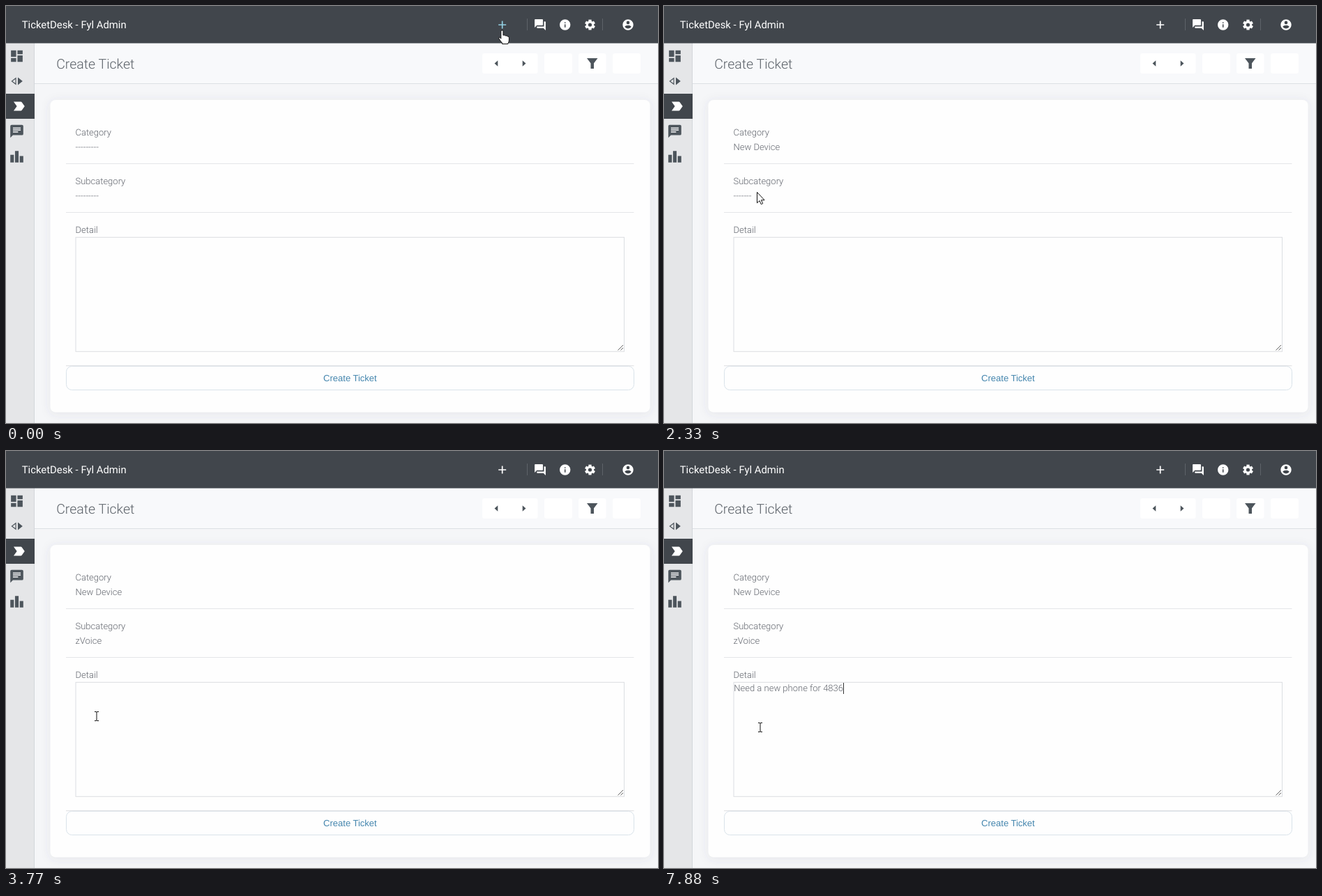
Recreate the animation shown at these times as an HTML page. Size 935 by 599 pixels, loop 8 s.

```html
<!DOCTYPE html>
<html lang="en">
<head>
<meta charset="utf-8">
<title>Create Ticket</title>
<style>
html, body { margin: 0; width: 100%; height: 100%; overflow: hidden; background: #f5f6f8; }
svg { display: block; position: absolute; left: 0; top: 0; }
text { font: 300 13px Roboto, sans-serif; fill: #62666e; white-space: pre; text-rendering: geometricPrecision; }
.brand { font-weight: 400; font-size: 14.86px; fill: #fff; }
.title { font-size: 19.5px; fill: #5c6269; }
.btn { font: 400 13px "Liberation Sans", Arial, sans-serif; fill: #4586ae; text-anchor: middle; }
.rule { stroke: #e4e5e8; }
.dark { fill: #4d555c; }
</style>
</head>
<body>
<svg width="935" height="599" viewBox="0 0 935 599">
  <defs>
    <filter id="soft" x="-5%" y="-10%" width="110%" height="120%">
      <feDropShadow dx="0" dy="2" stdDeviation="7" flood-color="#46506a" flood-opacity=".1"/>
    </filter>
    <filter id="drop" x="-2%" y="-10%" width="104%" height="120%">
      <feDropShadow dx="1" dy="2" stdDeviation="2" flood-opacity=".35"/>
    </filter>
  </defs>

  <rect width="935" height="599" fill="#f5f6f8"/>
  <rect y="53" width="935" height="58" fill="#f8f9fb"/>
  <path d="M41 111.5H935" stroke="#dde0e4"/>
  <rect y="53" width="40" height="546" fill="#e5e6e8"/>
  <path d="M40.5 53V599" stroke="#d3d6da"/>
  <rect y="126" width="41" height="36" fill="#41464c"/>
  <rect width="935" height="53.5" fill="#41464c"/>

  <text class="brand" x="22.7" y="32">TicketDesk - Fyl Admin</text>
  <path d="M747.5 18V35M855.5 18V35" stroke="#5e6369"/>
  <path id="plus" d="M706.2 27H717.2M711.7 21.5V32.5" stroke-width="1.7"/>
  <g id="gear" transform="translate(837.5 27)">
    <circle r="5.7" fill="#fff"/>
    <path id="tooth" d="M0-7.4V7.4" stroke="#fff" stroke-width="4.2"/>
    <use href="#tooth" transform="rotate(60)"/>
    <use href="#tooth" transform="rotate(120)"/>
    <circle r="2.6" fill="#41464c"/>
  </g>
  <g id="icons"></g>
  <path d="M14 103.7L8.4 108 14 112.3Z" fill="none" stroke="#4d555c" stroke-width="1.2"/>
  <path class="dark" d="M17 102.5L23.8 108 17 113.5Z"/>

  <text class="title" x="72.2" y="89.8">Create Ticket</text>
  <g fill="#fff">
    <rect x="683" y="68" width="79.5" height="29" rx="3"/>
    <rect x="772" y="68" width="40" height="29" rx="3"/>
    <rect x="821" y="68" width="39.5" height="29" rx="3"/>
    <rect x="870" y="68" width="40" height="29" rx="3"/>
  </g>
  <path class="dark" d="M705.3 78.3V86.7L700.5 82.5ZM740.7 78.3V86.7L745.5 82.5ZM833 75H848.5L843 82.3V90H838.5V82.3Z"/>

  <rect x="63.5" y="135" width="860" height="448.5" rx="8" fill="#fefefe" filter="url(#soft)"/>
  <path class="rule" d="M86 226.5H900.5M86 296.5H900.5"/>
  <text x="99.5" y="186">Category</text>
  <text x="99.5" y="256">Subcategory</text>
  <text x="99.5" y="325.5">Detail</text>
  <text id="category" x="99.5" y="206.5"></text>
  <text id="subcategory" x="99.5" y="276.5"></text>
  <rect x="100" y="332.3" width="786.5" height="164" fill="#fefefe" stroke="#dcdee2"/>
  <path d="M877.5 494.5L885 487M881.5 494.5L885 491" stroke="#666"/>
  <rect x="86.5" y="517.5" width="814" height="34" rx="8" fill="#fefefe" stroke="#d9e3ea"/>
  <path d="M86 516.8H900.5" stroke="#dcdde0"/>
  <text class="btn" x="493.4" y="539">Create Ticket</text>

  <text id="detail" x="100.3" y="345.4"></text>
  <path id="caret" stroke="#333" d="M0 333V349"/>
  <g id="menu"></g>
  <path id="cursor" stroke-linejoin="round"/>
</svg>
<script>
const $ = id => document.getElementById(id);
const CIRCLE = 'M12 2a10 10 0 1 0 0 20a10 10 0 1 0 0-20z';

// 24-unit icon paths: centre x, centre y, size, colour, path
const icons = [
  [766, 27, 19, '#fff', 'M21 6h-2v9H6v2q0 1 1 1h11l4 4V7q0-1-1-1zM17 12V3q0-1-1-1H3q-1 0-1 1v14l4-4h10q1 0 1-1z'],
  [801.7, 27, 18.5, '#fff', CIRCLE + 'M13 17h-2v-6h2zM13 9h-2V7h2z'],
  [892, 27, 18.5, '#fff', CIRCLE + 'M12 5a3 3 0 1 1 0 6a3 3 0 1 1 0-6zM12 19.2q-3.8 0-6-3.2c0-2 4-3.1 6-3.1s6 1.1 6 3.1q-2.2 3.2-6 3.2z'],
  [15.5, 72, 22.3, '#4d555c', 'M3 13h8V3H3zM3 21h8v-6H3zM13 21h8V11h-8zM13 3v6h8V3z'],
  [18.4, 144, 22.3, '#fff', 'M4 19h11q1 0 1.6-.8L21 12l-4.4-6.2Q16 5 15 5H4l5 7z'],
  [15.5, 180, 22.3, '#4d555c', 'M20 2H4Q2 2 2 4v18l4-4h14q2 0 2-2V4q0-2-2-2zM6 9h12v2H6zM14 14H6v-2h8zM18 8H6V6h12z'],
  [15.5, 216.5, 22.3, '#4d555c', 'M7.5 21H2V9h5.5zM14.75 3h-5.5v18h5.5zM22 11h-5.5v10H22z'],
  [791.7, 82.6, 21, '#4d555c', 'M19 8l-4 4h3a6 6 0 0 1-8.8 5.3l-1.46 1.46A8 8 0 0 0 20 12h3zM6 12a6 6 0 0 1 8.8-5.3l1.46-1.46A8 8 0 0 0 4 12H1l4 4 4-4z'],
  [889.5, 82.6, 22.3, '#4d555c', 'M3 18h6v-2H3zM3 6v2h18V6zM3 13h12v-2H3z']
];
$('icons').innerHTML = icons.map(([x, y, size, fill, d]) =>
  `<path fill="${fill}" fill-rule="evenodd" d="${d}" transform="translate(${x} ${y}) scale(${size / 24}) translate(-12 -12)"/>`).join('');

const cursors = {
  arrow: { d: 'M0 0V15.4L3.5 12.2 5.8 17.3 8.2 16.2 5.9 11.3H10.6Z', fill: '#fff', stroke: '#111' },
  hand: {
    d: 'M-1.7 12V1.5a1.6 1.6 0 0 1 3.2 0V7q3-.6 3.2.8 2.6-.5 3 .9 2.2-.2 2.2 1.6V14q0 2.5-1.5 4.5V19.5H0V18Q-2.5 15.5-4.6 11.8q-.4-1.8 1-1.8 1 .2 1.9 2Z',
    fill: '#fff', stroke: '#111'
  },
  beam: { d: 'M-3-6.5H-1L0-5.8 1-6.5H3M0-5.8V5.8M-3 6.5H-1L0 5.8 1 6.5H3', fill: 'none', stroke: '#111' }
};

// Stepped tracks: time, then values held until the next step
const pointer = [
  [0, 711.5, 35, 'hand'], [120, 690, 60, 'arrow'], [240, 545, 104, 'arrow'],
  [360, 350, 148, 'arrow'], [480, 230, 169, 'arrow'], [620, 195, 188, 'arrow'],
  [740, 178, 201, 'arrow'], [860, 173.5, 205.5, 'arrow'], [1260, 166, 217, 'arrow'],
  [1380, 161.5, 226, 'arrow'], [1530, 158, 238, 'arrow'], [1650, 157.5, 247.5, 'arrow'],
  [2070, 145, 257, 'arrow'], [2190, 134, 266.5, 'arrow'], [2330, 133.5, 267.5, 'arrow'],
  [2980, 132, 310, 'arrow'], [3100, 130.5, 341.5, 'arrow'], [3220, 130, 354, 'arrow'],
  [3340, 130, 367, 'arrow'], [3460, 130, 376, 'arrow'], [3620, 130, 379.5, 'arrow'],
  [3770, 130, 381, 'beam'], [3890, 133, 389, 'beam'], [4010, 136, 395, 'beam'],
  [4160, 137.5, 396.5, 'beam'], [4280, 138, 397, 'beam']
];
const typed = [
  [0, 0], [4940, 1], [5080, 2], [5200, 3], [5470, 5], [5610, 6], [5730, 7], [5850, 8],
  [5970, 9], [6090, 11], [6240, 12], [6370, 14], [6490, 15], [6610, 17], [6760, 19],
  [6880, 20], [7030, 21], [7580, 22], [7730, 23], [7880, 25]
];
const caretOn = [[0, 0], [4160, 1], [4660, 0], [4940, 1], [7460, 0], [7580, 1]];
const message = 'Need a new phone for 4836';
const menus = [
  { from: 980, to: 1930, top: 210, rows: [[980, 0], [1530, 1], [1650, 2]],
    items: ['---------', 'Email', 'New Device', 'Damage', 'Server', 'Software Issues', 'Software Request'] },
  { from: 2700, to: 3770, top: 280, rows: [[2700, 0], [2980, 1], [3100, 3], [3220, 4], [3340, 5], [3620, 6]],
    items: ['-------', 'Desktop', 'Laptop', 'Office Phone', 'Other Device', 'zTab', 'zVoice'] }
];

const at = (track, t) => track.filter(k => k[0] <= t).pop().slice(1);

function menuMarkup(menu, active) {
  const pitch = 16.35, y0 = menu.top + 1;
  const rows = menu.items.map((item, i) => {
    const y = y0 + i * pitch, on = i === active;
    const bar = on ? `<rect x="100.5" y="${Math.round(y)}" width="785.5" height="16.3" fill="#1e90ff"/>` : '';
    return `${bar}<text x="100.4" y="${y + 12.2}"${on ? ' style="fill:#fff"' : ''}>${item}</text>`;
  });
  return `<rect x="100" y="${menu.top + .5}" width="786.5" height="115.3" fill="#fefefe" stroke="#6a6a6a" filter="url(#drop)"/>` + rows.join('');
}

function setText(id, s) {
  if ($(id).textContent !== s) $(id).textContent = s;
}

let menuKey = '';
function draw(t) {
  const [x, y, kind] = at(pointer, t);
  const shape = cursors[kind], cursor = $('cursor');
  for (const name in shape) cursor.setAttribute(name, shape[name]);
  cursor.setAttribute('transform', `translate(${x} ${y})`);
  $('plus').setAttribute('stroke', t < 120 ? '#93cfe2' : '#fff');

  setText('category', t < 1930 ? '---------' : 'New Device');
  setText('subcategory', t < 1930 ? '---------' : t < 3770 ? '-------' : 'zVoice');
  setText('detail', message.slice(0, at(typed, t)[0]));

  const end = 100.3 + $('detail').getComputedTextLength();
  $('caret').setAttribute('transform', `translate(${Math.floor(end) + .5 + (end < 101 ? 1 : 0)} 0)`);
  $('caret').setAttribute('opacity', at(caretOn, t)[0]);

  const menu = menus.find(m => t >= m.from && t < m.to);
  const row = menu ? at(menu.rows, t)[0] : 0;
  const key = menu ? menu.top + ':' + row : '';
  if (key !== menuKey) {
    $('menu').innerHTML = menu ? menuMarkup(menu, row) : '';
    menuKey = key;
  }
}

function tick() {
  draw(performance.now() % 8000);
  requestAnimationFrame(tick);
}
tick();
</script>
</body>
</html>
```
